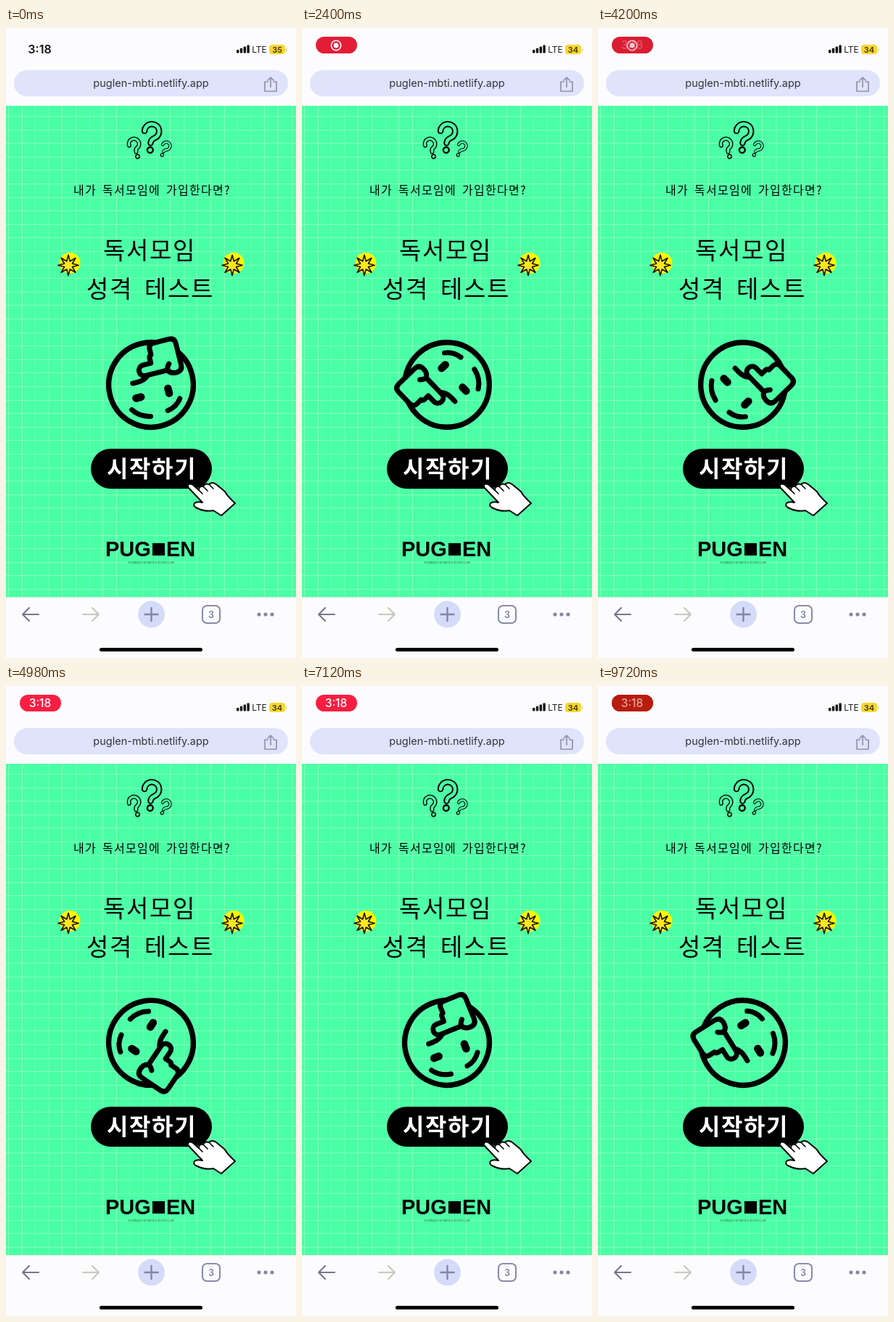
Animation of 400x867 px, one loop 9.74 s. Source, as an HTML page with a canvas:

```html
<!DOCTYPE html>
<html lang="ko">
<head>
<meta charset="utf-8">
<title>독서모임 성격 테스트</title>
<style>
html, body { margin: 0; width: 100%; height: 100%; overflow: hidden; background: #fcfcfe; }
canvas { display: block; width: 400px; height: 867px; }
</style>
</head>
<body>
<canvas id="stage"></canvas>
<script>
const W = 400, H = 867, LOOP = 9740;
const MINT = '#4affa6', PAPER = '#fcfcfe', INK = '#000';
const UI = 'Inter, "Open Sans", sans-serif';
const KOREAN = '"Noto Sans CJK KR", "Noto Sans CJK", sans-serif';
const LATIN = '"Liberation Sans", Arial, sans-serif';
const canvas = document.getElementById('stage');
const scale = window.devicePixelRatio || 1;
canvas.width = W * scale;
canvas.height = H * scale;
const ctx = canvas.getContext('2d');

const clamp = v => Math.max(0, Math.min(1, v));
const ramp = (t, from, span) => clamp((t - from) / span);
const mix = (a, b, k) => `rgb(${a.map((v, i) => Math.round(v + (b[i] - v) * k)).join(',')})`;

function rect(x, y, w, h, r, fill) {
  ctx.beginPath();
  ctx.roundRect(x, y, w, h, r);
  ctx.fillStyle = fill;
  ctx.fill();
}

function disc(x, y, r, fill) {
  ctx.beginPath();
  ctx.arc(x, y, r, 0, Math.PI * 2);
  ctx.fillStyle = fill;
  ctx.fill();
}

function line(d, color, width, fill) {
  const path = new Path2D(d);
  if (fill) {
    ctx.fillStyle = fill;
    ctx.fill(path);
  }
  ctx.strokeStyle = color;
  ctx.lineWidth = width;
  ctx.stroke(path);
}

function text(str, x, y, font, color, align = 'center') {
  ctx.font = font;
  ctx.fillStyle = color;
  ctx.textAlign = align;
  ctx.fillText(str, x, y);
}

// Hangul on a fixed advance with half-width spaces
function hangul(str, x, y, size, advance, weight, color) {
  const gap = advance - size * 0.92;
  ctx.letterSpacing = gap + 'px';
  ctx.wordSpacing = advance / 2 - size * 0.224 - gap + 'px';
  text(str, x, y, `${weight} ${size}px ${KOREAN}`, color, 'left');
  ctx.letterSpacing = ctx.wordSpacing = '0px';
}

function at(x, y, angle, size, draw) {
  ctx.save();
  ctx.translate(x, y);
  ctx.rotate(angle * Math.PI / 180);
  ctx.scale(size, size);
  draw();
  ctx.restore();
}

function grid() {
  ctx.fillStyle = MINT;
  ctx.fillRect(0, 107, W, 677);
  ctx.fillStyle = '#86ffb4';
  for (let x = 3; x < W; x += 18.6) ctx.fillRect(Math.round(x), 107, 1, 677);
  for (let y = 121; y < 784; y += 18.6) ctx.fillRect(0, Math.round(y), W, 1);
}

function question() {
  const hook = 'M-9 -8 A9.5 9.5 0 1 1 4 0.5 Q0 2.5 0 7';
  line(hook, INK, 8);
  line(hook, MINT, 4.4);
  disc(0, 16, 4.8, INK);
  disc(0, 16, 2.6, MINT);
}

function star(x) {
  disc(x + 2, 323.5, 14.5, '#fff500');
  ctx.beginPath();
  for (let i = 0; i < 16; i++) {
    const r = i % 2 ? 6 : 14, a = i * Math.PI / 8 - Math.PI / 2;
    ctx.lineTo(x + r * Math.cos(a), 326.5 + r * Math.sin(a));
  }
  ctx.closePath();
  ctx.fillStyle = '#ffe81e';
  ctx.fill();
  ctx.strokeStyle = '#1c1600';
  ctx.lineWidth = 1.7;
  ctx.stroke();
}

function face(t) {
  at(200, 491, (t - 8240) * 0.1, 1, () => {
    ctx.beginPath();
    ctx.arc(0, 0, 58.3, 0, Math.PI * 2);
    ctx.strokeStyle = INK;
    ctx.lineWidth = 7.4;
    ctx.stroke();
    line('M-42 -11 Q-39 -26 -27 -34 M-40 14 Q-38 27 -28 34', INK, 7);
    line('M-13 -24.5 V-17.5 M-17.5 21.5 H-10.5', INK, 10.5);
    line('M8 -24 V-17 Q8 -8 13 -2', INK, 7);
    line('M14 27 V-4 A7.5 7.5 0 0 1 29 -4 V7 H36 Q39 7 40 10 H48 Q55 10 55 17 V39 Q55 47 47 47'
      + ' H17 Q8 47 8 38 Q8 30 14 27 Q18 27 22 31', INK, 7, MINT);
  });
}

function pointer() {
  line('M251 632 Q250 626 257 628 L266 636 Q266 630 272 631 Q274 626 280 628 Q284 624 290 628'
    + ' L302 638 Q305 644 316 654 L297 671 L286 664 Q274 666 264 661 Q257 658 260 654 Q263 651 271 653 Z',
    INK, 2, '#fff');
  line('M266 636 L271 641 M272 631 L278 637 M280 628 L286 634', INK, 1.6);
}

function wordmark() {
  const font = `bold 29px ${LATIN}`;
  text('PUG', 137, 727, font, INK, 'left');
  ctx.fillStyle = INK;
  ctx.fillRect(202, 709, 17, 17);
  text('EN', 221, 727, font, INK, 'left');
  text("SORANJU WOMEN'S BOOKCLUB", 200, 737, `4px ${LATIN}`, '#14723a');
}

function page(t) {
  grid();
  at(200, 151, 4, 1.06, question);
  at(178, 165.5, -17, 0.74, question);
  at(219, 166.5, 24, 0.56, question);
  hangul('내가 독서모임에 가입한다면?', 93, 229, 16, 16, 500, INK);
  hangul('독서모임', 134, 318, 33, 32, 500, INK);
  hangul('성격 테스트', 111, 371, 33, 32, 500, INK);
  star(86);
  star(312);
  face(t);
  rect(117, 579, 167, 55, 27.5, INK);
  hangul('시작하기', 139, 618, 32, 31, 700, '#fff');
  pointer();
  wordmark();
}

function recordPill(t) {
  const shown = ramp(t, 300, 300), toTime = ramp(t, 4150, 200), press = ramp(t, 9560, 140);
  text('3:18', 46.5, 35, `600 16px ${UI}`, `rgba(20,20,24,${1 - shown})`);
  if (!shown) return;
  const glow = 0.5 + 0.5 * Math.cos((t - 4980) * Math.PI / 1000);
  ctx.globalAlpha = shown;
  rect(19, 12, 57, 23, 11.5, mix([214, 28, 48], [250, 30, 66], glow));
  ctx.globalAlpha = shown * (1 - toTime);
  ctx.beginPath();
  ctx.arc(47, 24, 6.7, 0, Math.PI * 2);
  ctx.strokeStyle = '#fff';
  ctx.lineWidth = 1.6;
  ctx.stroke();
  disc(47, 24, 3.4, '#fff');
  ctx.globalAlpha = toTime;
  text('3:18', 47, 29, `500 15.5px ${UI}`, '#fff');
  ctx.globalAlpha = press;
  if (press) {
    rect(19, 12, 57, 23, 11.5, '#b81c0e');
    text('3:18', 47, 29, `500 15.5px ${UI}`, '#e3a39b');
  }
  ctx.globalAlpha = 1;
}

function topBar(t) {
  ctx.fillStyle = PAPER;
  ctx.fillRect(0, 0, W, 107);
  recordPill(t);
  for (let i = 0; i < 4; i++) {
    const h = 4.5 + i * 2.2;
    rect(318 + i * 4.8, 34.5 - h, 3.4, h, 1, '#111');
  }
  text('LTE', 349.5, 34, `12px ${UI}`, '#222');
  rect(363, 23, 22, 13, 4, '#f8d62e');
  rect(386, 27.5, 1.6, 4.5, 0.8, '#d8d2ac');
  text(t < 2400 ? '35' : '34', 374, 33.5, `600 11px ${UI}`, '#403600');

  rect(11, 58, 378, 36, 18, '#dfe3fb');
  text('puglen-mbti.netlify.app', 200, 81, `14.5px ${UI}`, '#34343c');
  line('M361 74 H357 V87 H373 V74 H369 M365 81 V68 M361 72 L365 68 L369 72', '#9092ad', 1.7);
}

function toolbar() {
  ctx.fillStyle = PAPER;
  ctx.fillRect(0, 784, W, 83);
  ctx.fillStyle = '#d9eee3';
  ctx.fillRect(0, 783, W, 1);
  line('M45 807 H23 M32 798 L23 807 L32 816', '#77778f', 2.2);
  line('M106 807 H128 M119 798 L128 807 L119 816', '#c9c6bd', 2.2);
  disc(200.5, 807, 18.5, '#d5dcfa');
  line('M191.5 807 H209.5 M200.5 798 V816', '#8286a2', 2.4);
  ctx.beginPath();
  ctx.roundRect(271, 795, 24, 24, 6);
  ctx.strokeStyle = '#898bad';
  ctx.lineWidth = 2.1;
  ctx.stroke();
  text('3', 283, 811.5, `600 12.5px ${UI}`, '#7e80a2');
  for (const x of [349, 358, 367]) disc(x, 807, 2.6, '#8587a5');
  rect(129, 853, 142, 5, 2.5, '#000');
}

function frame(now) {
  const t = now % LOOP;
  ctx.setTransform(scale, 0, 0, scale, 0, 0);
  ctx.lineCap = ctx.lineJoin = 'round';
  page(t);
  topBar(t);
  toolbar();
}

let start;
function tick(now) {
  start ??= now;
  frame(Math.max(0, now - start));
  requestAnimationFrame(tick);
}
frame(0);
requestAnimationFrame(tick);
</script>
</body>
</html>
```
